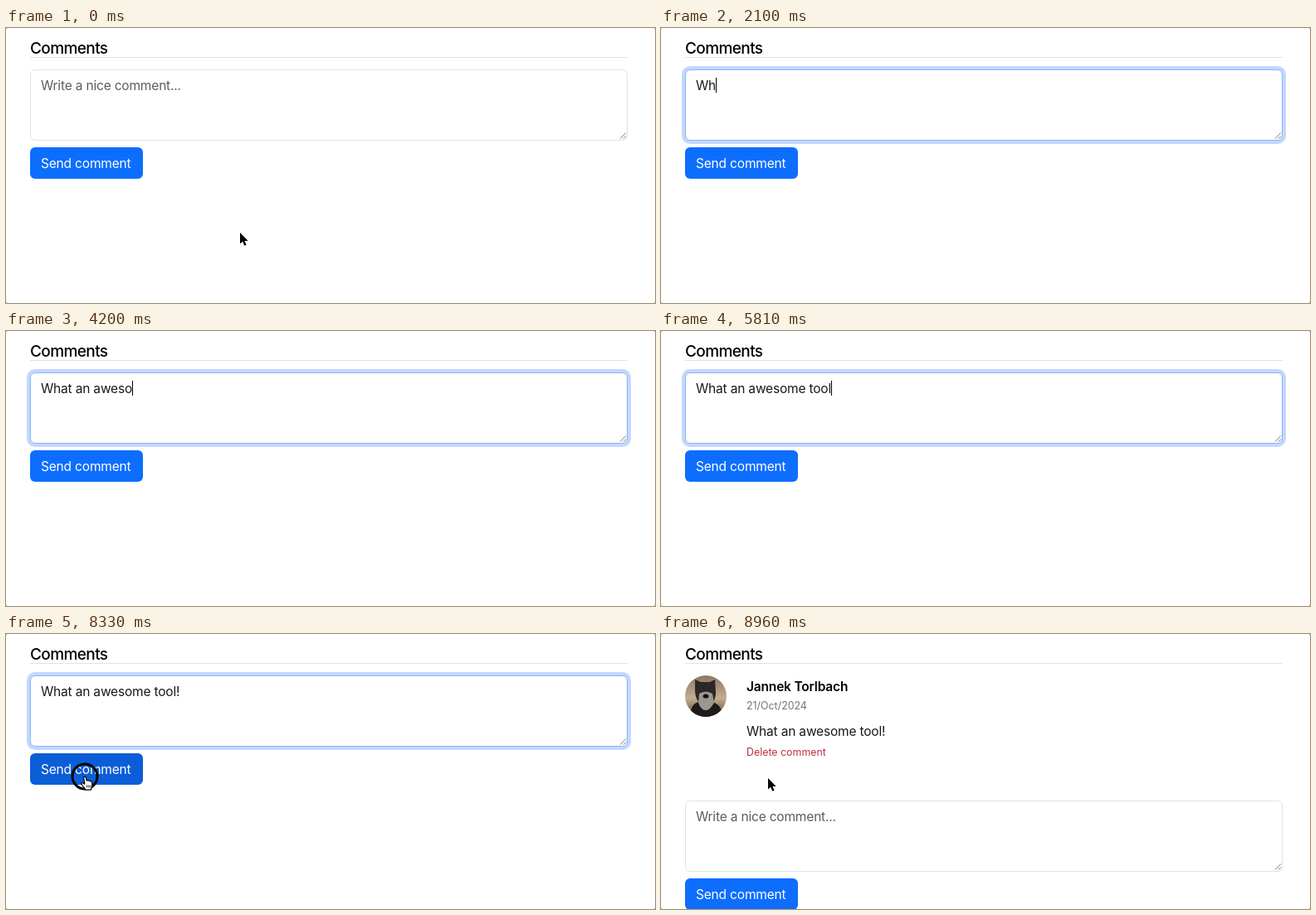
An HTML page that plays this animation: 782x332 px, repeating every 9030 ms.

```html
<!DOCTYPE html>
<html lang="en">
<head>
<meta charset="utf-8">
<title>Comments</title>
<style>
  html, body { margin: 0; width: 100%; height: 100%; overflow: hidden; background: #8a8a8a; }
  svg { display: block; width: 782px; height: 332px; }
  text { font: 400 15.5px Inter, "Liberation Sans", sans-serif; letter-spacing: -.18px; fill: #17191c; white-space: pre; }
  .title { font-size: 19px; font-weight: 500; letter-spacing: -.6px; fill: #000; }
  .name { font-weight: 600; fill: #000; }
  .small { font-size: 12.4px; letter-spacing: 0; fill: #6c757d; }
  .danger { fill: #bd3040; }
  .hint { fill: #595c5f; }
  .label { fill: #fff; }
</style>
</head>
<body>
<svg viewBox="0 0 782 332">
  <defs>
    <linearGradient id="room" x2="0" y2="1">
      <stop offset="0" stop-color="#8b7862"/>
      <stop offset=".55" stop-color="#c3ad90"/>
      <stop offset="1" stop-color="#5b4b3c"/>
    </linearGradient>
    <clipPath id="disc"><circle cx="54" cy="75" r="25"/></clipPath>
  </defs>
  <rect width="782" height="332" rx="2" fill="#fff"/>
  <text class="title" x="29" y="31">Comments</text>
  <rect x="29" y="35" width="720" height="1" fill="#dee2e6"/>

  <g id="post">
    <g clip-path="url(#disc)">
      <rect x="29" y="50" width="50" height="50" fill="url(#room)"/>
      <path d="M35 100Q36 82 47 82H61Q73 84 74 100Z" fill="#1d1b1b"/>
      <path d="M41 69L41 55L48 58H59L65 55L66 70Q66 85 54 86Q42 85 41 69Z" fill="#292727"/>
      <path d="M46 72Q54 67 62 72L64 83Q58 93 54 92Q48 92 45 83Z" fill="#9b9690"/>
      <ellipse cx="54" cy="75" rx="3.4" ry="2.6" fill="#111"/>
    </g>
    <text class="name" x="103" y="69">Jannek Torlbach</text>
    <text class="small" x="103" y="91">21/Oct/2024</text>
    <text x="103" y="123">What an awesome tool!</text>
    <text class="small danger" x="103" y="147">Delete comment</text>
  </g>

  <g id="form">
    <rect id="glow" x="27" y="48" width="724" height="90" rx="8" fill="none" stroke="#c2d7fe" stroke-width="4"/>
    <rect x="29.5" y="50.5" width="719" height="85" rx="5.5" fill="#fff" stroke="#dee2e6"/>
    <rect id="edge" x="29.5" y="50.5" width="719" height="85" rx="5.5" fill="none" stroke="#86b7fe"/>
    <path d="M740 133.5L747 126.5M744 133.5L747 130.5" stroke="#666" stroke-width=".9"/>
    <text id="hint" class="hint" x="42" y="75">Write a nice comment...</text>
    <text id="typed" x="42" y="75" xml:space="preserve"></text>
    <rect id="caret" y="60" width="1" height="18" fill="#000"/>
    <rect id="button" x="29" y="144" width="136" height="38" rx="6"/>
    <text class="label" x="42" y="169">Send comment</text>
  </g>

  <g id="pointer">
    <circle id="click" r="15" fill="none" stroke="#000" stroke-width="3"/>
    <path id="arrow" d="M0 0V13.6L3.1 10.7L5.3 15.8L7.6 14.8L5.4 9.9H9.7Z" stroke="#fff" stroke-width="1.6" paint-order="stroke" stroke-linejoin="round"/>
    <g id="beam" fill="none">
      <path d="M-3.5 -7.5Q0 -7.5 0 -5V5Q0 7.5 -3.5 7.5M3.5 -7.5Q0 -7.5 0 -5V5Q0 7.5 3.5 7.5M-2 1.5H2" stroke="#fff" stroke-width="2.4"/>
      <path d="M-3.5 -7.5Q0 -7.5 0 -5V5Q0 7.5 -3.5 7.5M3.5 -7.5Q0 -7.5 0 -5V5Q0 7.5 3.5 7.5M-2 1.5H2" stroke="#000"/>
    </g>
    <g id="hand" stroke="#000" stroke-linejoin="round">
      <path d="M-1.4 .9Q0 -.7 1.3 .9L2.2 5Q3.3 4 4.3 5.1Q5.5 4.2 6.5 5.8Q8.3 5.3 8.7 7.2C9.2 10.4 8.2 12.2 7.4 16.2H.6C-.6 12.7 -3 11.2 -4.4 8.8Q-3.8 6.8 -2 8L-.2 9.2Z" fill="#fff" stroke-width="1.2"/>
      <path d="M2.4 10.4V13.4M4.3 10.4V13.4M6.2 10.4V13.4" stroke-width=".8"/>
    </g>
  </g>
</svg>
<script>
const LOOP = 9030, TICK = 70;
const MESSAGE = 'What an awesome tool!';
const KEYS = [1610, 2100, 2240, 2380, 2520, 2660, 2870, 3010, 3290, 3710, 3850,
  3990, 4200, 4550, 4690, 4900, 5320, 5460, 5670, 5810, 6300];
const POSTED = 8820;
// time, x, y of the pointer's hot spot
const PATH = [[0, 282, 247], [700, 167, 85], [7490, 167, 85], [7910, 99, 152],
  [8330, 95, 172], [8540, 95, 172], [8680, 95, 160], [8960, 129, 174]];

const el = Object.fromEntries([...document.querySelectorAll('[id]')].map(e => [e.id, e]));
const within = (t, a, b) => t >= a && t < b;
const ramp = (t, start, length = 150) => Math.min(1, Math.max(0, (t - start) / length));
const ease = k => k * k * (3 - 2 * k);
const show = (e, on) => e.setAttribute('visibility', on ? 'inherit' : 'hidden');
const mix = (a, b, k) => `rgb(${a.map((v, i) => Math.round(v + (b[i] - v) * k))})`;

function pointerAt(t) {
  const next = PATH.findIndex(p => p[0] > t);
  if (next < 0) return PATH.at(-1).slice(1);
  const [t0, x0, y0] = PATH[next - 1], [t1, x1, y1] = PATH[next];
  const k = ease((t - t0) / (t1 - t0));
  return [x0 + (x1 - x0) * k, y0 + (y1 - y0) * k];
}

function drawForm(t, posted) {
  const text = posted ? '' : MESSAGE.slice(0, KEYS.filter(k => k <= t).length);
  if (el.typed.textContent !== text) el.typed.textContent = text;
  show(el.hint, !text);
  const width = text ? el.typed.getComputedTextLength() : 0;
  el.caret.setAttribute('x', Math.round(42 + width));
  show(el.caret, within(t, 770, 1260) || within(t, KEYS[0], 6790));

  const focus = ease(ramp(t, 735)) - ease(ramp(t, 8400));
  el.glow.setAttribute('opacity', focus);
  el.edge.setAttribute('opacity', focus);
  const hover = posted ? 0 : ramp(t, 7900);
  el.button.setAttribute('fill', mix([13, 110, 253], [11, 94, 215], hover));
  el.form.setAttribute('transform', `translate(0 ${posted ? 151 : 0})`);
}

function drawPointer(t, posted) {
  const [x, y] = pointerAt(t);
  const inBox = !posted && y < 136;
  const onButton = !posted && y >= 144 && y < 182 && x < 165;
  el.pointer.setAttribute('transform', `translate(${x.toFixed(1)} ${y.toFixed(1)})`);
  show(el.pointer, !within(t, 1680, 7000));
  show(el.beam, inBox);
  show(el.hand, onButton);
  show(el.arrow, !inBox && !onButton);
  show(el.click, within(t, 700, 910) || within(t, 8330, 8540));
}

const start = performance.now();
function frame() {
  const now = Math.max(0, performance.now() - start) % LOOP;
  const t = Math.floor(now / TICK) * TICK;
  const posted = t >= POSTED;
  show(el.post, posted);
  drawForm(t, posted);
  drawPointer(t, posted);
  requestAnimationFrame(frame);
}
frame();
</script>
</body>
</html>
```
